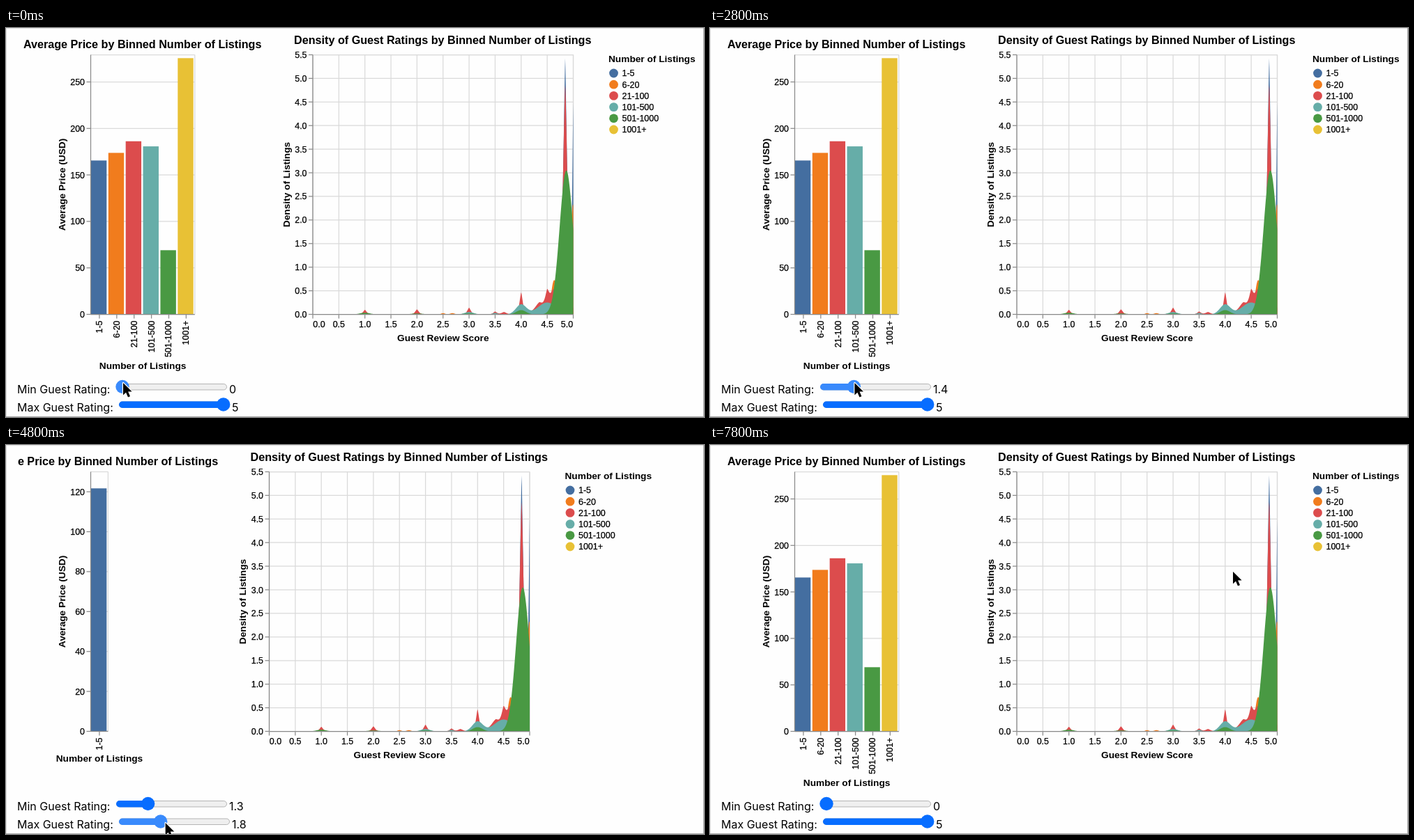
These frames come from a looping animation (1001x559 px, 8000 ms). An HTML page with a canvas:

```html
<!DOCTYPE html>
<html lang="en">
<head>
<meta charset="utf-8">
<title>Listings dashboard</title>
<style>
html, body { margin: 0; width: 100%; height: 100%; overflow: hidden; background: #fefefe; }
canvas { display: block; }
</style>
</head>
<body>
<canvas id="stage" width="1001" height="559"></canvas>
<script>
const ctx = document.getElementById('stage').getContext('2d');
const LOOP = 8000, STEP = 200;
const TOP = 38.5, BOTTOM = 411.5, HEIGHT = BOTTOM - TOP;
const BAND = 24.88, BAR = 22.4, LEFT = 121.5, WIDTH = 373.5;
const GRID = '#dadada', AXIS = '#8a8a8a';
const BINS = ['1-5', '6-20', '21-100', '101-500', '501-1000', '1001+'];
const COLORS = ['#446ea0', '#f17c1d', '#dc4c4d', '#66ada8', '#499943', '#e8c135'];

// Key tables: first column is the position, the rest are values
const MIN_KEYS = [[200, 0], [1400, 5], [1800, 5], [2600, 1.7], [2800, 1.4], [3000, 1.3], [6600, 1.3], [7000, 0]];
const MAX_KEYS = [[3400, 5], [3600, 4.6], [4000, 2.6], [4400, 1.5], [4600, 1.5], [4800, 1.8], [5200, 3.6],
  [5600, 4.8], [5800, 5]];
const ALL_PRICES = [165.5, 173.7, 186.2, 180.7, 69, 275.6];
const PRICE_BY_MIN = [[3, ...ALL_PRICES], [5, 166.5, 193, 166, 149, 54.5, 265]];
const PRICE_BY_MAX = [[2.6, 130.5, 80.5, 97.5, 185, 40.5, 264], [4.8, 149, 158, 142.5, 134.5, 72.5, 267],
  [5, ...ALL_PRICES]];

// Each density curve is a sum of bumps: centre, height, width
const DENSITY = [
  { power: 1.3, bumps: [[4.845, 5.42, .06], [5, 4.3, .03]] },
  { power: 2, bumps: [[2.5, .025, .05], [2.68, .025, .06], [4.62, .6, .07], [4.85, 1.6, .14], [5, 1.8, .05]] },
  { power: 1.5, bumps: [[1, .095, .05], [2, .105, .05], [3, .14, .05], [3.5, .06, .05], [3.67, .05, .07],
    [4, .46, .045], [4.35, .25, .13], [4.5, .36, .06], [4.62, .5, .09], [4.845, 4.85, .065]] },
  { power: 2, bumps: [[3, .05, .12], [3.5, .03, .07], [4, .21, .14], [4.5, .25, .25]] },
  { power: 2, bumps: [[1, .035, .13], [2, .02, .15], [3, .02, .15], [4, .09, .13], [4.867, 3.05, .182]] }
];

const lerp = (a, b, f) => a + (b - a) * f;

function sample(keys, x) {
  if (x <= keys[0][0]) return keys[0].slice(1);
  const i = keys.findIndex(k => k[0] >= x);
  if (i < 0) return keys[keys.length - 1].slice(1);
  const a = keys[i - 1], b = keys[i], f = (x - a[0]) / (b[0] - a[0]);
  return a.slice(1).map((v, j) => lerp(v, b[j + 1], f));
}

function line(x1, y1, x2, y2, color) {
  ctx.strokeStyle = color;
  ctx.lineWidth = 1.25;
  ctx.beginPath();
  ctx.moveTo(x1, y1);
  ctx.lineTo(x2, y2);
  ctx.stroke();
}

function text(str, x, y, { size = 12.44, bold = false, align = 'center', turn = false, family = '"Liberation Sans", Arial' } = {}) {
  ctx.save();
  ctx.translate(x, y);
  if (turn) ctx.rotate(-Math.PI / 2);
  ctx.font = `${bold ? 'bold ' : ''}${size}px ${family}, sans-serif`;
  ctx.textAlign = align;
  ctx.fillStyle = ctx.strokeStyle = '#000';
  ctx.fillText(str, 0, size * .36);
  if (!bold && size < 14) {
    ctx.lineWidth = .25;
    ctx.strokeText(str, 0, size * .36);
  }
  ctx.restore();
}

const heading = (str, x, y) => text(str, x, y, { size: 16.17, bold: true });
const axisTitle = (str, x, y, opts) => text(str, x, y, { size: 13.68, bold: true, ...opts });

function disc(x, y, r, color) {
  ctx.fillStyle = color;
  ctx.beginPath();
  ctx.arc(x, y, r, 0, 7);
  ctx.fill();
}

function valueAxis(x, width, top, step, digits) {
  for (let v = 0; v <= top; v += step) {
    const y = BOTTOM - v / top * HEIGHT;
    line(x, y, x + width, y, GRID);
    line(x - 6, y, x, y, AXIS);
    text(v.toFixed(digits), x - 8.5, y, { align: 'right' });
  }
}

function frame(x, width) {
  line(x, TOP, x + width, TOP, GRID);
  line(x + width, TOP, x + width, BOTTOM, GRID);
}

function axisLines(x, width) {
  line(x, TOP, x, BOTTOM, AXIS);
  line(x, BOTTOM, x + width, BOTTOM, AXIS);
}

function priceChart(prices, single) {
  const top = single ? 130 : 279.2, width = BAND * prices.length, mid = LEFT + width / 2;
  frame(LEFT, width);
  valueAxis(LEFT, width, top, single ? 20 : 50, 0);
  prices.forEach((p, i) => {
    const h = p / top * HEIGHT, x = LEFT + BAND * (i + .5);
    ctx.fillStyle = COLORS[i];
    ctx.fillRect(LEFT + .4 + BAND * i, BOTTOM - h, BAR, h);
    line(x, BOTTOM, x, BOTTOM + 6, AXIS);
    text(BINS[i], x - .5, 420.5, { align: 'right', turn: true });
  });
  axisLines(LEFT, width);
  axisTitle('Average Price (USD)', 80.5, 225, { turn: true });
  axisTitle('Number of Listings', mid, single ? 450 : 485);
  ctx.save();
  ctx.beginPath();
  ctx.rect(16, 0, 400, 50);
  ctx.clip();
  heading('Average Price by Binned Number of Listings', mid - .5, 23.5);
  ctx.restore();
}

function densityArea({ power, bumps }, left, color) {
  ctx.fillStyle = color;
  ctx.beginPath();
  ctx.moveTo(left, BOTTOM);
  for (let i = 0; i <= 1000; i++) {
    const score = i / 200;
    const d = bumps.reduce((sum, [c, h, w]) => sum + h * Math.exp(-((Math.abs(score - c) / w) ** power)), 0);
    ctx.lineTo(left + score / 5 * WIDTH, BOTTOM - d / 5.5 * HEIGHT);
  }
  ctx.lineTo(left + WIDTH, BOTTOM);
  ctx.fill();
}

function densityChart(left) {
  const mid = left + WIDTH / 2;
  frame(left, WIDTH);
  for (let v = 0; v <= 5; v += .5) {
    const x = left + v / 5 * WIDTH;
    line(x, TOP, x, BOTTOM, GRID);
    line(x, BOTTOM, x, BOTTOM + 6, AXIS);
    text(v.toFixed(1), x + (v === 0 ? 9 : v === 5 ? -9 : 0), 426);
  }
  valueAxis(left, WIDTH, 5.5, .5, 1);
  DENSITY.forEach((layer, i) => densityArea(layer, left, COLORS[i]));
  axisLines(left, WIDTH);
  heading('Density of Guest Ratings by Binned Number of Listings', mid - .5, 17.5);
  axisTitle('Guest Review Score', mid, 445);
  axisTitle('Density of Listings', left - 38, 225, { turn: true });

  axisTitle('Number of Listings', left + 424, 44.5, { align: 'left' });
  BINS.forEach((bin, i) => {
    const y = 65 + 16.2 * i;
    disc(left + 431.5, y, 6.4, COLORS[i]);
    text(bin, left + 443.5, y, { align: 'left' });
  });
}

const thumbX = (x, value) => x + 9 + value * 28.15;

function slider(label, value, x, y, active) {
  const color = active ? '#398afc' : '#076dff', thumb = thumbX(x, value);
  const ui = { size: 16, align: 'left', family: 'Inter' };
  text(label, 16, y + 4, ui);
  text(String(value), x + 162, y + 4, ui);
  ctx.beginPath();
  ctx.roundRect(x + .5, y - 4, 158, 8.5, 4.25);
  ctx.fillStyle = '#efefef';
  ctx.fill();
  ctx.strokeStyle = '#b4b4b4';
  ctx.lineWidth = 1;
  ctx.stroke();
  ctx.beginPath();
  ctx.roundRect(x, y - 4.5, thumb - x, 9.5, 4.75);
  ctx.fillStyle = color;
  ctx.fill();
  disc(thumb, y, 9.7, color);
}

// The pointer leads the dragged thumb slightly and glides between sliders
function pointerAt(t) {
  const onMin = time => [thumbX(159, sample(MIN_KEYS, time)[0]), 510];
  const onMax = time => [thumbX(162, sample(MAX_KEYS, time + 55)[0]), 543];
  const glide = (from, to, start, span) => from.map((v, i) => lerp(v, to[i], (t - start) / span));
  if (t <= 3000) return onMin(t);
  if (t < 3400) return glide(onMin(3000), onMax(3400), 3000, 400);
  if (t <= 6200) return onMax(t);
  if (t < 6600) return glide(onMax(6200), onMin(6600), 6200, 400);
  if (t <= 7000) return onMin(t);
  return glide(onMin(7000), [750, 182], 7000, 800);
}

const ARROW = new Path2D('M0 0V17.5L4 13.8 7 20.5 10 19.2 7.1 12.6H12.6Z');

function pointer(x, y) {
  ctx.save();
  ctx.translate(x, y);
  ctx.lineJoin = 'round';
  ctx.lineWidth = 2.4;
  ctx.strokeStyle = '#fff';
  ctx.stroke(ARROW);
  ctx.fillStyle = '#000';
  ctx.fill(ARROW);
  ctx.restore();
}

function draw(t) {
  const round = v => Math.round(v * 10) / 10;
  const min = round(sample(MIN_KEYS, t)[0]), max = round(sample(MAX_KEYS, t)[0]);
  const single = max < 2;
  const prices = single ? [121.7] : max < 5 ? sample(PRICE_BY_MAX, max) : sample(PRICE_BY_MIN, min);
  ctx.fillStyle = '#fefefe';
  ctx.fillRect(0, 0, 1001, 559);
  line(0, .5, 1001, .5, '#e2e2e2');
  line(.5, 0, .5, 559, '#e2e2e2');
  line(1000.5, 0, 1000.5, 559, '#ababab');
  line(0, 558.5, 1001, 558.5, '#ababab');
  priceChart(prices, single);
  densityChart(single ? 377.5 : 440);
  slider('Min Guest Rating:', min, 158, 515.5, t <= 3000 || t >= 6600 && t <= 7000);
  slider('Max Guest Rating:', max, 162, 541, t >= 3400 && t <= 6200);
  pointer(...pointerAt(t));
}

function tick() {
  const t = performance.now() % LOOP;
  draw(t - t % STEP);
  requestAnimationFrame(tick);
}
tick();
</script>
</body>
</html>
```
